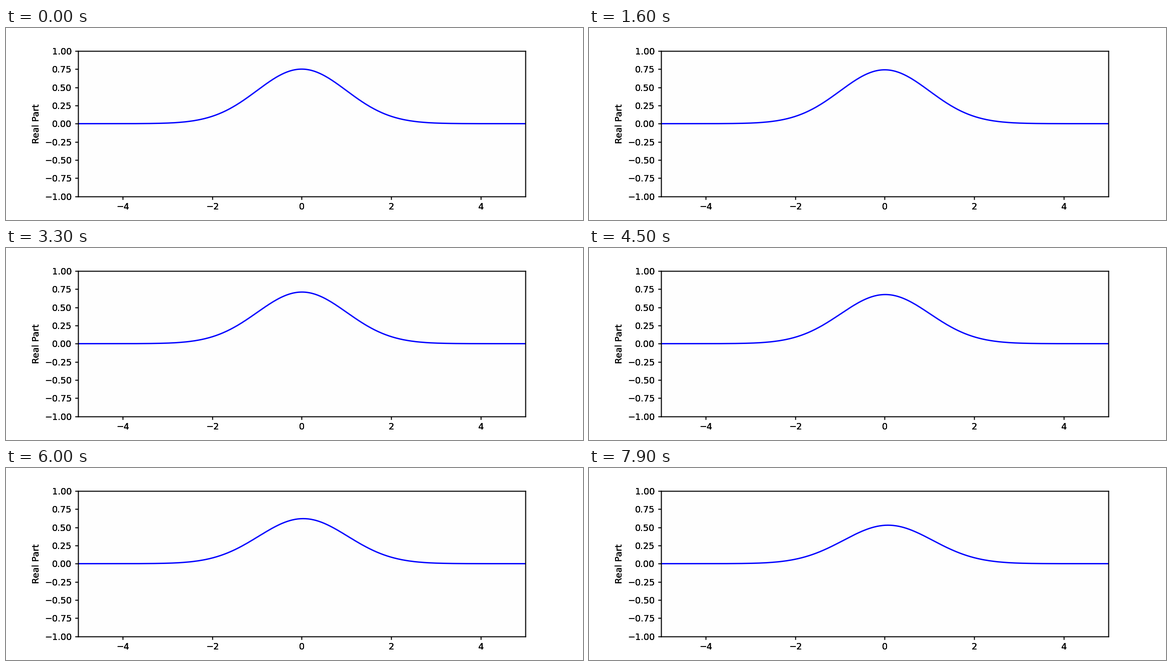
Animation, 1152 px wide and 384 px high, one loop 8 s. Source, as a matplotlib script:

```python
import numpy as np
import matplotlib.pyplot as plt
from matplotlib.animation import FuncAnimation

FRAMES = 80
INTERVAL = 100      # ms
DT = 0.02           # oscillator time per frame
FORCE = 0.047       # growth rate of the driving force
RECT = [0.125, 0.1235, 0.775, 0.7565]

plt.rcParams["font.family"] = "DejaVu Sans"
plt.rcParams["font.size"] = 10

fig = plt.figure(figsize=(9, 3), dpi=128, facecolor="white")


def make_axes(name, **style):
    ax = fig.add_axes(RECT, label=name, **style)
    ax.set_xlim(-5, 5)
    ax.set_ylim(-1, 1)
    ax.set_xticks(np.arange(-4, 5, 2))
    ax.set_yticks(np.linspace(-1, 1, 9))
    ax.set_ylabel("Real Part")
    return ax


ax = make_axes("plot", facecolor="#fefefe")
# Stacked copies of the frame and labels darken their soft edges
for k in range(2):
    make_axes(f"overlay{k}", facecolor="none")

x = np.linspace(-5, 5, 500)


def real_part(t):
    """Ground-state packet of an oscillator under a slowly rising force."""
    center = FORCE * (t - np.sin(t))
    momentum = FORCE * (1 - np.cos(t))
    envelope = np.pi ** -0.25 * np.exp(-(x - center) ** 2 / 2)
    return envelope * np.cos(momentum * (x - center / 2) - t / 2)


line, = ax.plot(x, real_part(0), color="blue", lw=1.5)


def update(i):
    line.set_ydata(real_part(i * DT))
    return line,


anim = FuncAnimation(fig, update, frames=FRAMES, interval=INTERVAL,
                     init_func=lambda: update(0), repeat=True,
                     repeat_delay=0, blit=False)
plt.show()
```
